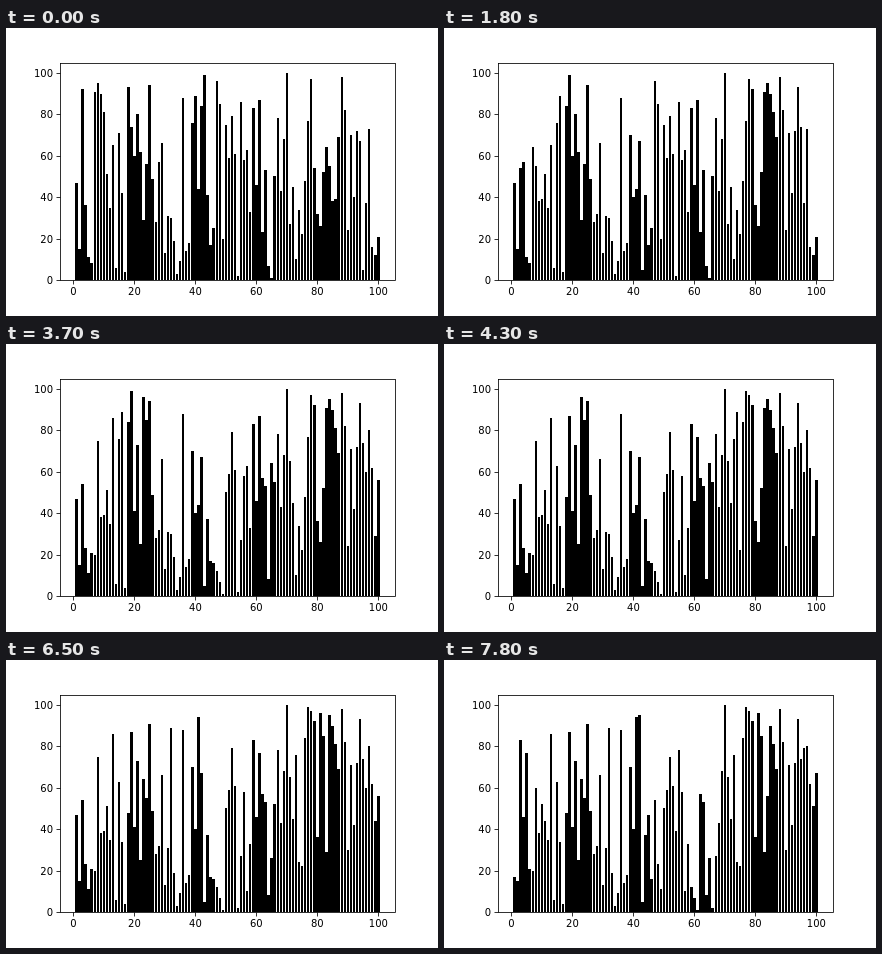
An HTML page with a canvas that plays this animation: 432 px wide and 288 px high, repeating every 8 s.

```html
<!DOCTYPE html>
<html lang="en">
<head>
<meta charset="utf-8">
<title>Shell sort</title>
<style>
  html, body { margin: 0; width: 100%; height: 100%; overflow: hidden; background: #fff; }
  canvas { display: block; }
</style>
</head>
<body>
<canvas id="chart" width="432" height="288"></canvas>
<script>
const ctx = document.getElementById('chart').getContext('2d');

const STEP_MS = 100, LOOP_MS = 8000;
const LEFT = 54, RIGHT = 389, TOP = 35, BOTTOM = 252;
const UNIT_X = 334.8 / 109.78, UNIT_Y = 217.44 / 105;
const plotX = v => LEFT + (v + 4.39) * UNIT_X;
const plotY = v => BOTTOM - v * UNIT_Y;

const START = [
  47, 15, 92, 36, 11, 8, 91, 95, 90, 81, 51, 35, 65, 6, 71, 42, 4, 93, 74, 60,
  80, 62, 29, 56, 94, 49, 28, 57, 66, 13, 31, 30, 19, 3, 9, 88, 14, 18, 76, 89,
  44, 84, 99, 41, 17, 25, 96, 85, 20, 75, 59, 79, 61, 2, 86, 58, 63, 33, 83, 46,
  87, 23, 53, 7, 1, 50, 78, 43, 68, 100, 27, 45, 10, 34, 22, 48, 77, 97, 54, 32,
  26, 52, 64, 55, 38, 39, 69, 98, 82, 24, 70, 40, 72, 67, 5, 37, 73, 16, 12, 21
];
const COUNT = START.length;

// Insertion sort of one column; the comparison below index 0 wraps to the end.
function sortColumn(values, first, gap) {
  const wrap = i => (i + COUNT) % COUNT;
  for (let i = first + gap; i < COUNT; i += gap) {
    for (let j = i; j >= 0; j -= gap) {
      const k = wrap(j - gap);
      if (values[k] <= values[j]) break;
      [values[k], values[j]] = [values[j], values[k]];
    }
  }
}

// One column per step, with one idle step between gap sizes.
function valuesAt(lastStep) {
  const values = START.slice();
  let gap = 76, column = 0;
  for (let step = 0; step <= lastStep; step++) {
    if (column < COUNT - gap) {
      sortColumn(values, column++, gap);
    } else {
      gap = Math.floor(gap / 1.3);
      column = 0;
    }
  }
  return values;
}

function line(x1, y1, x2, y2) {
  ctx.beginPath();
  ctx.moveTo(x1, y1);
  ctx.lineTo(x2, y2);
  ctx.stroke();
}

function drawAxes() {
  ctx.strokeStyle = '#000';
  ctx.lineWidth = 0.8;
  ctx.strokeRect(LEFT + 0.5, TOP + 0.5, RIGHT - LEFT, BOTTOM - TOP);
  ctx.font = '10px "DejaVu Sans", sans-serif';
  for (let v = 0; v <= 100; v += 20) {
    const x = Math.round(plotX(v)), y = Math.round(plotY(v));
    line(x + 0.5, BOTTOM + 0.5, x + 0.5, BOTTOM + 4.5);
    line(LEFT - 2.5 - 1, y + 0.5, LEFT + 0.5, y + 0.5);
    ctx.textAlign = 'center';
    ctx.fillText(v, plotX(v), BOTTOM + 15);
    ctx.textAlign = 'right';
    ctx.fillText(v, LEFT - 7, y + 4);
  }
}

function draw(step) {
  ctx.fillStyle = '#fff';
  ctx.fillRect(0, 0, 432, 288);
  ctx.fillStyle = '#000';
  valuesAt(step).forEach((value, i) => {
    const x = Math.round(plotX(i + 0.6)), y = Math.round(plotY(value));
    ctx.fillRect(x, y, Math.round(plotX(i + 1.4)) - x, BOTTOM - y);
  });
  drawAxes();
}

const origin = performance.now();
function tick() {
  const time = Math.max(0, performance.now() - origin) % LOOP_MS;
  draw(Math.floor(time / STEP_MS));
  requestAnimationFrame(tick);
}
tick();
</script>
</body>
</html>
```
